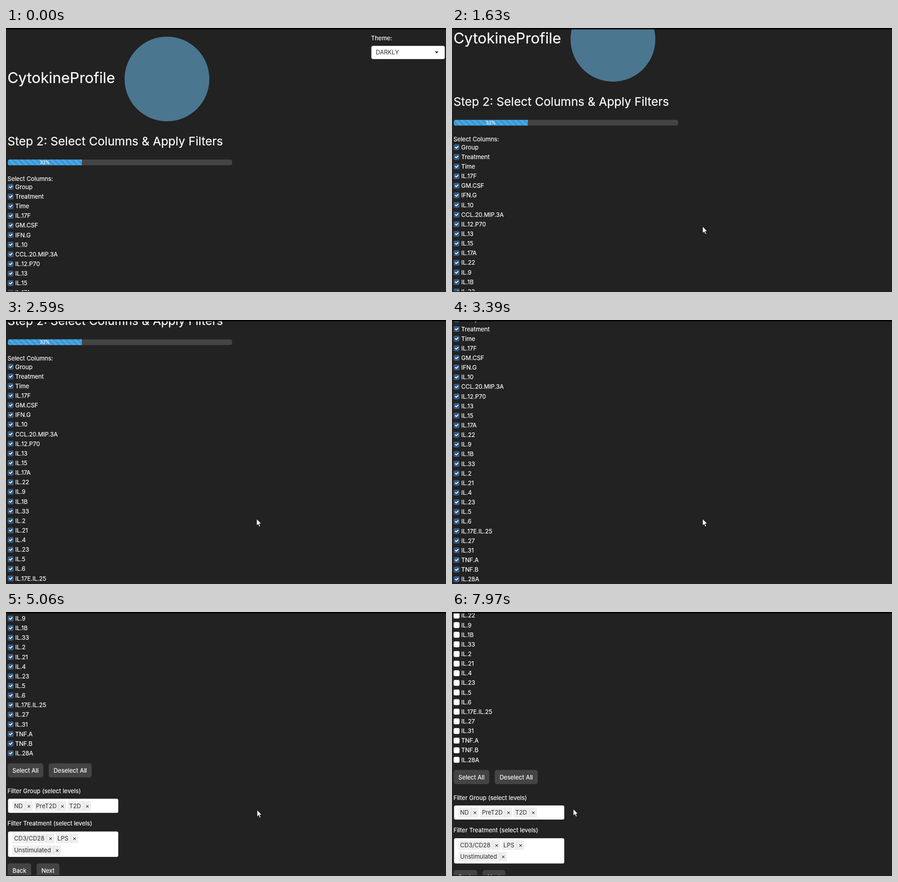
An HTML page for the animation above (8000 ms loop, 965x580 px).

```html
<!DOCTYPE html>
<html lang="en">
<head>
<meta charset="utf-8">
<title>Select columns</title>
<style>
  html, body { margin: 0; width: 100%; height: 100%; overflow: hidden; background: #222; }
  svg { display: block; width: 965px; height: 580px; }
  text { font: 400 13px Inter, "Noto Sans", sans-serif; font-optical-sizing: none; fill: #fff;
    stroke: #fff; stroke-width: .2px; white-space: pre; }
  .dark { fill: #2b2b2b; stroke: none; }
  .mid { text-anchor: middle; }
</style>
</head>
<body>
<svg id="stage" viewBox="0 0 965 580">
  <defs>
    <clipPath id="view"><rect y="3" width="965" height="575"/></clipPath>
    <clipPath id="bar"><rect x="4" y="288.7" width="492" height="13" rx="4.5"/></clipPath>
    <pattern id="stripes" x="4" y="288.7" width="13" height="13" patternUnits="userSpaceOnUse">
      <path d="M0 6.5V13H6.5ZM0 0H6.5L13 6.5V13Z" fill="#fff" fill-opacity=".15"/>
    </pattern>
  </defs>
  <rect width="965" height="580" fill="#222"/>
  <g clip-path="url(#view)"><g id="page"></g></g>
  <rect width="965" height="3" fill="#000"/>
  <rect y="578" width="965" height="2" fill="#151515"/>
  <rect y="578" width="965" height="1" fill="#352e2f"/>
  <path id="arrow" d="M0 0V14.8L3.4 11.6L5.8 17.2L8.2 16.2L5.8 10.7H10.4Z" fill="#fff" stroke="#000" stroke-width=".8"/>
  <g id="hand" stroke="#000" stroke-width="1" stroke-linejoin="round">
    <path fill="#fff" d="M-1.7 1.7a1.7 1.7 0 0 1 3.4 0V7.2q2.4-.9 2.9.7q2.4-.6 2.8.9q1.9-.3 1.9 1.7V14q0 2.2-1.6 4.2V20H-1.5V18.4L-4.8 12.8q-.8-2 .6-2.4q1.1-.2 2.5 2.2Z"/>
    <path fill="none" stroke-width=".7" d="M1.7 7.2V10.5M4.6 8V11M7.4 9V11.5"/>
  </g>
</svg>
<script>
const LOOP = 8000, ROW = 21.14, TICK = 87.1;
const columns = ("Group Treatment Time IL.17F GM.CSF IFN.G IL.10 CCL.20.MIP.3A IL.12.P70 IL.13 IL.15 " +
  "IL.17A IL.22 IL.9 IL.1B IL.33 IL.2 IL.21 IL.4 IL.23 IL.5 IL.6 IL.17E.IL.25 IL.27 IL.31 " +
  "TNF.A TNF.B IL.28A").split(" ");

const $ = id => document.getElementById(id);
const page = $("page");

function add(tag, attrs, content) {
  const el = document.createElementNS("http://www.w3.org/2000/svg", tag);
  for (const k in attrs) el.setAttribute(k, attrs[k]);
  if (content) el.textContent = content;
  return page.appendChild(el);
}
const rect = (x, y, width, height, fill, rx = 0) => add("rect", { x, y, width, height, fill, rx });
const label = (x, y, str, cls = "", size = 13) =>
  add("text", { x, y, class: cls, style: `font-size:${size}px` }, str);

function button(x, y, w, str) {
  const box = rect(x, y, w, 31, "#444", 5);
  label(x + w / 2, y + 20.4, str, "mid");
  return box;
}

// Selected level: text, divider and remove sign
function tag(x, y, sep, str) {
  rect(x - 4.5, y - 10.5, sep + 21 - x, 21, "#efefef", 2.5);
  rect(sep, y - 10.5, 1, 21, "#dcdcdc");
  label(x - 0.6, y + 4.7, str, "dark");
  label(sep + 8.3, y + 4.7, "×", "dark mid");
}

// Header
label(3.2, 120.8, "CytokineProfile", "", 32.7);
add("circle", { cx: 353, cy: 112, r: 93, fill: "#4a7690" });
label(800.5, 26.6, "Theme:");
rect(801.3, 39.3, 161, 29, "#fff", 4);
label(811, 58.2, "DARKLY", "dark");
add("path", { d: "M940.5 51.5H948.5L944.5 55.7Z", fill: "#222" });

// Progress
label(3.3, 257.7, "Step 2: Select Columns & Apply Filters", "", 26.1);
const bar = [rect(4, 288.7, 492, 13, "#444"), rect(4, 288.7, 162.4, 13, "#3498db"),
  rect(4, 288.7, 162.4, 13, "url(#stripes)")];
bar.forEach(b => b.setAttribute("clip-path", "url(#bar)"));
label(85, 298.8, "33%", "mid", 9.75);

// Column list
label(3.3, 335.8, "Select Columns:");
const checks = columns.map((name, i) => {
  const y = 349.2 + ROW * i;
  label(20.3, y + 4.7, name);
  const box = rect(3.6, y - 6.6, 13, 13, "#375a7f", 3.25);
  const mark = add("path", {
    d: "M6 10l3 3l6-6", transform: `translate(3.6 ${y - 6.6}) scale(.65)`, fill: "none",
    stroke: "#fff", "stroke-width": 3, "stroke-linecap": "round", "stroke-linejoin": "round"
  });
  return { box, mark };
});

// Buttons and filters
const selectAll = button(3.7, 942.2, 78, "Select All");
const deselectAll = button(93.7, 942.2, 94.3, "Deselect All");
label(3.3, 1007.6, "Filter Group (select levels)");
rect(4.5, 1020, 241.7, 31, "#fff", 3.5);
tag(18.4, 1035.6, 42, "ND");
tag(66.4, 1035.6, 115.5, "PreT2D");
tag(139.4, 1035.6, 170, "T2D");
label(3.3, 1079.2, "Filter Treatment (select levels)");
rect(4.5, 1092, 241.7, 55.6, "#fff", 3.5);
tag(18.4, 1107.3, 89.5, "CD3/CD28");
tag(113.4, 1107.3, 142, "LPS");
tag(18.4, 1132.7, 104, "Unstimulated");
button(3.7, 1162, 51.5, "Back");
button(67, 1162, 50, "Next");

const ramp = (t, a, b) => Math.min(1, Math.max(0, (t - a) / (b - a)));
const ease = (t, a, b) => { const u = ramp(t, a, b); return u * u * (3 - 2 * u); };

// Wheel ticks: start, end, direction
const ticks = [[1465, 1630, 1], [2040, 2260, 1], [2440, 2645, 1], [2890, 3130, 1], [3370, 3600, 1],
  [3870, 4070, 1], [4380, 4590, 1], [7920, 8116, -1]];
// Pointer moves: start, end, x, y
const moves = [[0, 0, 807, 555], [140, 330, 546, 428.5], [840, 870, 545.5, 428.5],
  [1080, 1200, 549.7, 436], [2395, 2405, 549.7, 437], [5050, 5060, 550.7, 435],
  [5490, 6260, 48, 355], [6730, 6830, 72, 358], [7170, 7400, 126, 353], [7580, 7890, 266, 432.7]];

function pointerAt(t) {
  let x = 0, y = 0;
  for (const [a, b, nx, ny] of moves) {
    if (t < a) break;
    const u = b > a ? ease(t, a, b) : 1;
    x += (nx - x) * u;
    y += (ny - y) * u;
  }
  return { x, y };
}

function shade(el, dark) {
  const v = Math.round(68 - dark);
  el.setAttribute("fill", `rgb(${v},${v},${v})`);
}

function draw(t) {
  const scroll = TICK * ticks.reduce((s, [a, b, dir]) => s + dir * ease(t, a, b), 0);
  page.setAttribute("transform", `translate(0 ${(-scroll).toFixed(2)})`);

  const on = t < 7650;
  for (const { box, mark } of checks) {
    box.setAttribute("fill", on ? "#375a7f" : "#fff");
    mark.setAttribute("visibility", on ? "visible" : "hidden");
  }

  shade(selectAll, (8 * ramp(t, 6110, 6260) + 3 * ramp(t, 6400, 6590)) * (1 - ramp(t, 7230, 7380)));
  shade(deselectAll, 10 * ramp(t, 7310, 7460) * (1 - ramp(t, 7680, 7830)));

  const { x, y } = pointerAt(t);
  const py = y + scroll;
  const over = py > 942 && py < 973 && ((x > 4 && x < 82) || (x > 94 && x < 188));
  const place = (el, show) => {
    el.setAttribute("transform", `translate(${x.toFixed(2)} ${y.toFixed(2)})`);
    el.setAttribute("visibility", show ? "visible" : "hidden");
  };
  place($("arrow"), t >= 160 && !over);
  place($("hand"), t >= 160 && over);
}

const start = performance.now();
function tick() {
  draw((performance.now() - start) % LOOP);
  requestAnimationFrame(tick);
}
tick();
</script>
</body>
</html>
```
